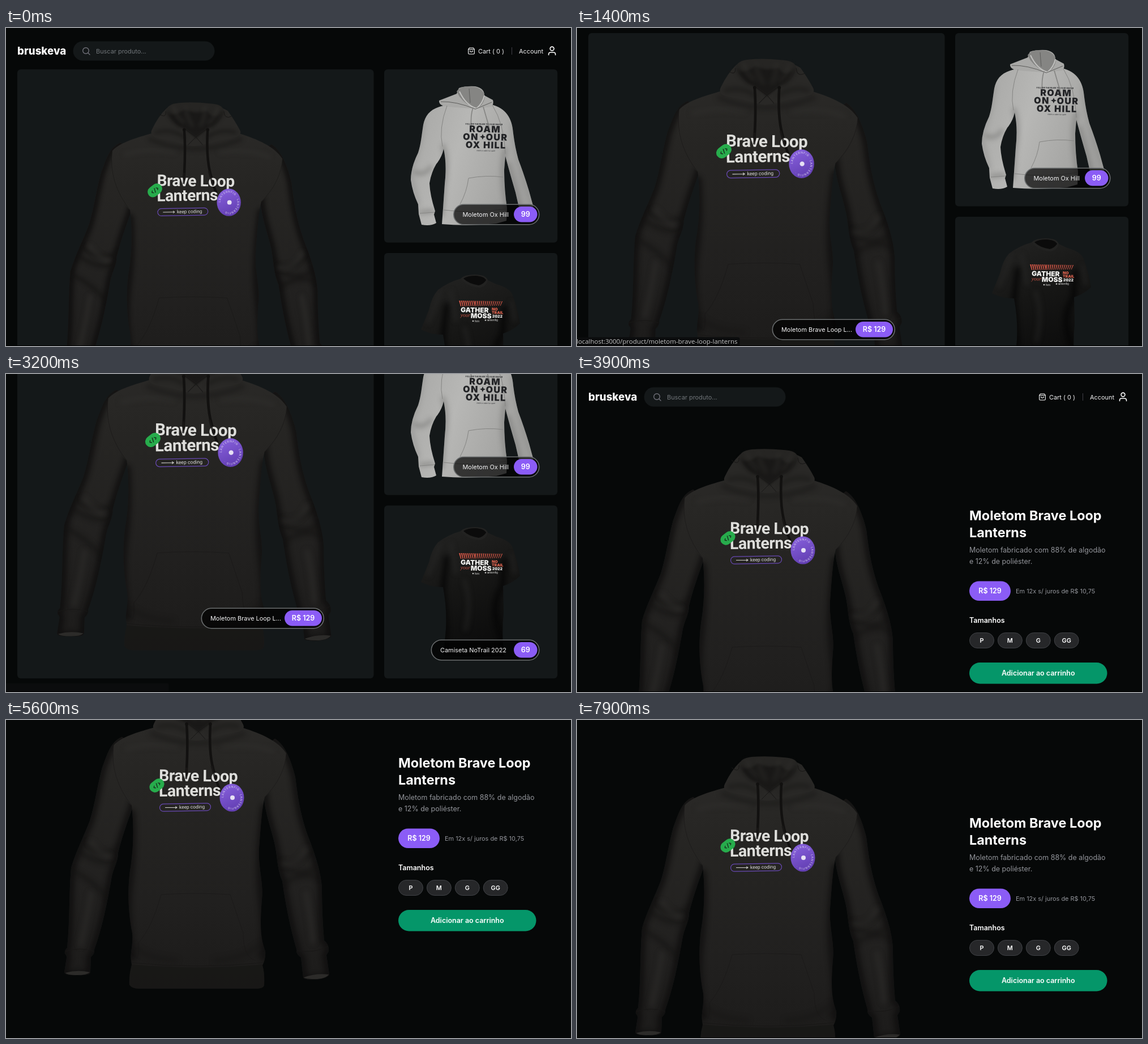
These frames come from a looping animation (998 px wide and 561 px high, 8 s). An HTML page:

```html
<!DOCTYPE html>
<html lang="pt-BR">
<head>
<meta charset="utf-8">
<title>bruskeva</title>
<style>
html, body { margin: 0; width: 100%; height: 100%; overflow: hidden; background: #060808; }
svg { display: block; width: 100%; height: 100%; font-family: Inter, sans-serif; }
text { white-space: pre; }
.line { fill: none; stroke: #fff; stroke-width: 1.4; stroke-linecap: round; stroke-linejoin: round; }
.fold { fill: none; stroke-linecap: round; filter: url(#soft); }
.rim { fill: none; stroke: #0e0d0d; stroke-width: 16; opacity: .75; filter: url(#soft); }
.seam { fill: none; stroke: #181716; stroke-width: 1; }
.print { font-family: Roboto, sans-serif; fill: #dededb; }
</style>
</head>
<body>
<svg viewBox="0 0 998 561">
<defs>
  <filter id="soft" x="-30%" y="-30%" width="160%" height="160%" color-interpolation-filters="sRGB"><feGaussianBlur stdDeviation="4"/></filter>
  <filter id="soft2" x="-30%" y="-30%" width="160%" height="160%" color-interpolation-filters="sRGB"><feGaussianBlur stdDeviation="2"/></filter>
  <linearGradient id="cloth" gradientUnits="userSpaceOnUse" x1="0" y1="40" x2="0" y2="558">
    <stop offset="0" stop-color="#2c2b29"/><stop offset=".3" stop-color="#262523"/>
    <stop offset=".7" stop-color="#21201f"/><stop offset="1" stop-color="#1c1b1a"/>
  </linearGradient>
  <linearGradient id="badge" x1="0" y1="0" x2=".4" y2="1"><stop offset="0" stop-color="#8a63e0"/><stop offset="1" stop-color="#6440b4"/></linearGradient>
  <linearGradient id="grey" x1="0" y1="0" x2="1" y2=".3"><stop offset="0" stop-color="#a6a6a4"/><stop offset=".45" stop-color="#b7b7b5"/><stop offset="1" stop-color="#a0a09e"/></linearGradient>
  <linearGradient id="tee" x1=".2" y1="0" x2=".5" y2="1"><stop offset="0" stop-color="#222221"/><stop offset=".45" stop-color="#161615"/><stop offset="1" stop-color="#0b0b0b"/></linearGradient>
  <clipPath id="cardClip"><rect x="20" y="73" width="629" height="629" rx="6"/></clipPath>
  <clipPath id="bodyClip"><path id="bodyShape" d="M262 97C240 104 205 112 190 129C186 165 200 215 222 235C226 270 226 310 219 350C215 380 215 420 223 460C225 480 219 495 221 508L222 516Q217 535 218 551Q222 558 235 558H440Q456 558 456 551Q457 530 453 517Q459 505 458 492C450 470 448 450 452 400C455 370 445 345 447 310C450 270 452 240 457 220C480 200 494 170 495 143C480 120 450 108 419 98L340 88Z"/></clipPath>
  <clipPath id="sleeveClip"><path id="sleeves" d="M205 114C184 122 178 148 170 168C160 205 158 230 148 262C138 288 122 320 115 345C111 390 113 440 108 486Q103 490 104 496Q108 500 107 504L103 529Q104 535 126 534Q150 535 149 528L150 502Q157 496 156 489C170 450 178 410 186 365C189 345 198 335 198 318C205 290 214 265 223 240L250 150ZM475 117C494 128 505 160 511 185C515 215 518 245 533 288C545 318 556 350 558 380C558 420 560 450 562 473Q571 480 570 492L566 499L571 533Q568 540 545 542Q525 542 525 538L521 503Q512 497 513 488C502 450 494 410 488 368C478 345 480 325 474 300C467 270 458 250 455 215L430 150Z"/></clipPath>
  <clipPath id="greyClip"><path id="greyShape" d="M778 136C754 140 741 150 737 171C734 190 733 205 728 220Q715 246 715 268Q718 290 728 311L729 328L734 347Q750 350 760 344L756 329L758 323Q749 295 748 274Q751 255 760 240Q770 228 773 213Q779 240 775 275L772 318L770 346Q815 350 866 345L884 340L885 318Q880 285 880 250L882 226Q890 256 900 290L908 325L935 328L924 288Q915 258 905 232Q899 210 896 186C894 157 882 142 858 135Z"/></clipPath>
  <clipPath id="teeClip"><path id="teeShape" d="M804 277Q782 283 763 297Q752 309 747 332L733 367Q750 376 772 376Q779 413 777 450L773 496Q825 501 880 497Q875 463 879 420L878 374Q896 368 908 356Q903 327 894 304Q888 293 866 287L851 280Z"/></clipPath>

  <g id="header">
    <text x="20" y="47" font-size="18.7" font-weight="800" fill="#fff">bruskeva</text>
    <rect x="118.500" y="23.500" width="250" height="34" rx="17" fill="#141819"/>
    <g class="line" style="stroke:#71717a"><circle cx="141" cy="40" r="5.300"/><path d="M145 44L148 47"/></g>
    <text x="159" y="44.500" font-size="10.92" fill="#71767a">Buscar produto...</text>
    <g class="line" style="stroke-width:1.100"><path d="M818.500 35H825.500L827.300 37.500V44.500Q827.300 46 825.800 46H818.200Q816.700 46 816.700 44.500V37.500ZM816.700 37.500H827.300M819.600 39.800Q819.600 42.200 822 42.200T824.400 39.800"/></g>
    <text x="834" y="44.500" font-size="10.92" fill="#f4f4f5">Cart ( 0 )</text>
    <rect x="893" y="34" width="1" height="13" fill="#3f3f46"/>
    <text x="906" y="44.500" font-size="10.92" fill="#f4f4f5">Account</text>
    <g class="line" style="stroke-width:1.600"><circle cx="964.500" cy="36.500" r="3.400"/><path d="M958.500 47.500V46.500Q958.500 43 962 43H967Q970.500 43 970.500 46.500V47.500"/></g>
  </g>

  <g id="hoodie">
    <use href="#sleeves" fill="url(#cloth)"/>
    <g clip-path="url(#sleeveClip)">
      <use href="#sleeves" class="rim"/>
      <path class="fold" stroke="#131211" stroke-width="7" opacity=".6" d="M132 318Q165 340 190 334M138 303Q170 326 198 312M118 350Q150 365 178 395M482 330Q510 345 538 318M488 345Q520 360 548 345M493 370Q528 352 552 362"/>
      <path class="fold" stroke="#302f2d" stroke-width="9" opacity=".5" d="M150 300Q168 322 182 324M490 337Q518 340 530 312M150 390Q144 430 132 480M530 390Q538 430 542 475"/>
      <path d="M105 530Q126 524 148 529Q143 534 126 534Q108 534 105 530ZM526 538Q548 530 570 533Q564 541 545 541Q528 541 526 538Z" fill="#2c2b29"/>
      <path class="seam" d="M105 492Q132 484 155 492M514 491Q545 496 569 483"/>
    </g>
    <use href="#bodyShape" fill="url(#cloth)"/>
    <g clip-path="url(#bodyClip)">
      <path class="fold" stroke="#0f0e0e" stroke-width="18" opacity=".7" d="M220 250Q224 310 216 370T220 500M458 240Q446 330 454 400T457 500"/>
      <path class="fold" stroke="#302f2d" stroke-width="12" opacity=".45" d="M215 135Q250 122 300 130M385 130Q440 125 470 140"/>
      <path class="fold" stroke="#171615" stroke-width="8" opacity=".5" d="M258 108Q338 142 420 108M228 485Q245 503 300 508M449 480Q420 505 370 508"/>
      <path d="M218 515Q338 526 456 515V558H218Z" fill="#151413" opacity=".55"/>
      <path class="seam" d="M220 512Q338 524 456 512"/>
    </g>
    <path class="seam" d="M274 392Q335 388 396 392L419 460Q419 502 440 508M274 392Q258 450 234 477Q236 500 230 506M190 129Q183 185 222 235M495 143Q492 185 457 220" opacity=".55"/>
    <path d="M288 52Q273 66 261 91Q256 102 271 106Q300 111 326 119Q338 122 352 118Q382 110 410 105Q423 101 419 92Q410 75 397 57L389 53Z" fill="#292826"/>
    <path d="M286 57Q289 45 309 43Q336 41 365 44Q388 45 390 57Q386 78 364 88L340 108L320 90Q295 78 286 57Z" fill="#262523"/>
    <path d="M292 63Q300 80 320 90L340 105L363 87Q378 78 383 62Q370 74 360 57Q338 64 320 54Q307 65 292 63Z" fill="#191817" filter="url(#soft2)"/>
    <path class="fold" stroke="#363532" stroke-width="4" opacity=".6" d="M300 50Q303 67 318 78M321 50Q322 65 334 84M356 50Q358 67 348 84M379 52Q377 69 362 80"/>
    <path class="fold" stroke="#121110" stroke-width="4" opacity=".75" d="M268 96Q298 88 320 105M411 96Q385 88 360 104M290 60Q297 76 312 85M388 60Q380 76 367 86"/>
    <path class="seam" d="M273 62Q287 72 286 58M404 67Q391 73 390 58M340 104L319 89M340 104L362 88M326 118L340 104L352 118"/>
    <path d="M319 91Q322 130 318 188M361 91Q358 140 366 170T376 202" fill="none" stroke="#121110" stroke-width="4.500" stroke-linecap="round"/>
    <circle cx="319" cy="91" r="2.800" fill="#11100f"/><circle cx="361" cy="91" r="2.800" fill="#11100f"/>
    <g class="print" font-size="28.5" font-weight="600" letter-spacing="-.45">
      <text x="270" y="191.500" transform="rotate(.6 270 191)">Brave Loop</text>
      <text x="270" y="219" transform="rotate(-.8 270 219)">Lanterns</text>
    </g>
    <path d="M319 168Q319 178 318 188M363 165Q367 180 371 191" fill="none" stroke="#191817" stroke-width="3.500" opacity=".8"/>
    <g transform="rotate(-1 316 238)">
      <rect x="271.500" y="231.500" width="90" height="13" rx="6.500" fill="none" stroke="#6849b4" stroke-width="1.200"/>
      <path d="M281 238H302M299 236L302 238L299 240" fill="none" stroke="#d0d0cc"/>
      <text class="print" x="306" y="240.500" font-size="8.4">keep coding</text>
    </g>
    <g transform="translate(266.500 199.500) rotate(-38)">
      <rect x="-14" y="-9.500" width="28" height="19" rx="9.500" fill="#27ac4c"/>
      <path d="M-4 -2.500L-6.500 0L-4 2.500M4 -2.500L6.500 0L4 2.500M1.500 -4L-1.500 4" fill="none" stroke="#16251a" stroke-width="1.300"/>
    </g>
    <g transform="translate(399 221)">
      <ellipse rx="21.500" ry="24.500" fill="url(#badge)"/>
      <path id="ring" d="M-15 0A15 17.500 0 0 1 15 0A15 17.500 0 0 1 -15 0" fill="none"/>
      <text font-size="5" font-weight="500" letter-spacing=".7" fill="#cdc0ec"><textPath href="#ring">LANTERNFIG · LANTERNFIG ·</textPath></text>
      <circle cx="1" cy="0" r="4" fill="#e6e0f4"/>
    </g>
  </g>

  <g id="greyHoodie">
    <use href="#greyShape" fill="url(#grey)"/>
    <g clip-path="url(#greyClip)">
      <path class="fold" stroke="#6c6c6a" stroke-width="7" opacity=".5" d="M772 208Q782 238 774 280L770 330M882 215Q874 245 880 290L885 325M722 254Q738 262 750 246M733 325L754 323M888 240L908 315"/>
      <path class="fold" stroke="#80807e" stroke-width="5" opacity=".5" d="M737 165Q733 205 714 255L728 311M894 170Q897 215 930 315"/>
    </g>
    <path d="M796 116L765 128Q764 135 774 138Q800 141 830 142L858 139Q862 133 860 127L845 119Q845 106 829 103Q811 102 800 106Z" fill="#a9a9a7"/>
    <path d="M796 112Q800 105 813 103L829 104Q844 108 846 122Q843 137 831 142Q812 136 801 121Z" fill="#858583"/>
    <path d="M801 112Q812 136 831 142Q842 133 845 119" fill="none" stroke="#c0c0be" stroke-width="2"/>
    <path d="M818 107L820 132M768 130Q795 129 829 143L858 131" fill="none" stroke="#5c5c5a"/>
    <path d="M825 140Q820 155 822 176M843 139Q849 160 855 180" fill="none" stroke="#858583" stroke-width="1.700"/>
    <path d="M817 265Q848 259 878 263M817 265Q814 289 802 311M773 321Q825 328 885 319M731 327L757 325M779 137Q764 177 771 209M859 136Q880 169 882 222" fill="none" stroke="#858583"/>
    <g transform="rotate(1 845 190)" text-anchor="middle" fill="#222326">
      <text x="844" y="171" font-size="3.6" font-weight="700">FOLLOW THE RIVER TO YOUR WATER</text>
      <g font-size="16" font-weight="900" letter-spacing="1.4">
        <text x="846" y="184">ROAM</text><text x="821" y="198">ON</text><text x="867" y="198">OUR</text>
        <text x="848" y="212">OX HILL</text>
      </g>
      <path d="M842 187L843.500 190.500L847 192L843.500 193.500L842 197L840.500 193.500L837 192L840.500 190.500Z"/>
      <text x="848" y="217.500" font-size="3">made in water for quiet</text>
    </g>
  </g>

  <g id="shirt" transform="translate(0 165)">
    <use href="#teeShape" fill="url(#tee)"/>
    <g clip-path="url(#teeClip)">
      <path class="fold" stroke="#2a2a29" stroke-width="7" opacity=".5" d="M766 302Q756 328 746 354M786 300L795 350M810 365Q823 400 812 450M893 320L899 350"/>
      <path class="fold" stroke="#050505" stroke-width="9" opacity=".8" d="M778 325L772 380L777 450L772 496M880 330L877 375Q852 410 876 465L880 497"/>
    </g>
    <path d="M803 277Q810 270 828 270Q848 270 851 280Q848 291 838 293Q814 292 803 277Z" fill="#222221"/>
    <path d="M808 277Q815 272 829 272Q845 273 848 280Q842 288 835 289Q817 286 808 277Z" fill="#0b0b0b"/>
    <g id="stripes" fill="#c95445"/>
    <g font-weight="900" fill="#f0f0ee" transform="rotate(1 840 335)">
      <text x="803" y="337" font-size="12">GATHER</text><text x="821" y="347" font-size="12">MOSS</text>
      <text x="803" y="345" font-size="9.5" font-weight="400" font-style="italic" font-family="Liberation Serif, serif" fill="#c95445">your</text>
      <g font-size="6.8"><text x="858" y="333" fill="#e06450">NO</text><text x="858" y="339" fill="#e06450">TRAIL</text><text x="859" y="345.500">2022</text></g>
    </g>
    <g font-size="4" font-weight="600" fill="#c9c9c7"><circle cx="825" cy="352" r="1.300"/><text x="828" y="353.500">fern</text><circle cx="847" cy="350.500" r="1.300"/><text x="850" y="352">lanternfig</text></g>
  </g>
</defs>

<rect width="998" height="561" fill="#060808"/>
<g id="store">
  <use href="#header"/>
  <g fill="#141819">
    <rect x="20" y="73" width="629.500" height="629" rx="6"/>
    <rect x="668" y="73" width="306" height="305.500" rx="6"/>
    <rect x="668" y="397" width="306" height="305" rx="6"/>
  </g>
  <g clip-path="url(#cardClip)"><g id="zoom"><use href="#hoodie" transform="translate(20 73) scale(.9859) translate(-20 17)"/></g></g>
  <use href="#greyHoodie"/><use href="#shirt"/>
  <g id="labels"/>
</g>
<g id="product">
  <use href="#header"/>
  <use href="#hoodie" y="90"/>
  <g id="details"/>
</g>
<g id="status">
  <path d="M0 545.500H284Q287.500 545.500 287.500 549V561H0Z" fill="#0b0c0d"/>
  <text id="link" x="-1" y="557" font-size="11.45" font-family="Open Sans, sans-serif" fill="#c4c4c4">localhost:3000/product/moletom-brave-loop-lanterns</text>
</g>
<rect y="560" width="998" height="1" fill="#000"/>
</svg>
<script>
const $ = id => document.getElementById(id);
const LOOP = 8000, STEP = 100;

function add(parent, tag, attrs, text) {
  const el = document.createElementNS('http://www.w3.org/2000/svg', tag);
  for (const k in attrs) el.setAttribute(k, attrs[k]);
  if (text) el.textContent = text;
  parent.append(el);
}
const write = (g, x, y, size, weight, fill, text, anchor = 'start') =>
  add(g, 'text', { x, y, 'font-size': size, 'font-weight': weight, fill, 'text-anchor': anchor }, text);

function pill(g, x, y, width, height, look, size, text) {
  add(g, 'rect', { x, y, width, height, rx: height / 2, ...look });
  write(g, x + width / 2, y + height / 2 + size * .363, size, 600, '#fff', text, 'middle');
}
const violet = { fill: '#8b5cf6' };

function label(x, y, right, name, priceX, price) {
  const g = $('labels');
  add(g, 'rect', { x: x + .8, y: y + .8, width: right - x - 1.6, height: 35.4, rx: 17.7,
    fill: '#000', 'fill-opacity': .7, stroke: '#696c6d', 'stroke-width': 1.6 });
  write(g, x + 16.5, y + 22, 10.92, 400, '#f4f4f5', name);
  pill(g, priceX, y + 4.5, right - 4 - priceX, 27.5, violet, 12.48, price);
}
label(344.5, 577.5, 562, 'Moletom Brave Loop L...', 492, 'R$ 129');
label(790, 310.5, 942.5, 'Moletom Ox Hill', 897, '99');
label(750.5, 633.5, 942.5, 'Camiseta NoTrail 2022', 897, '69');

for (let i = 0; i < 22; i++) {
  const x = 800 + i * 3.6, w = 2.5 - i * .05, lean = i < 8 ? 2 : -1 - i * .12;
  add($('stripes'), 'path', { d: `M${x} ${316 + i * .05}h${w}l${lean} ${10 - i * .1}h${-w * .6}Z` });
}

const d = $('details');
write(d, 693, 258, 23.4, 700, '#fff', 'Moletom Brave Loop');
write(d, 693, 287.5, 23.4, 700, '#fff', 'Lanterns');
write(d, 693, 315, 12.48, 400, '#93959b', 'Moletom fabricado com 88% de algodão');
write(d, 693, 335, 12.48, 400, '#93959b', 'e 12% de poliéster.');
pill(d, 693, 365.5, 73, 34.5, violet, 12.48, 'R$ 129');
write(d, 775, 386.5, 10.92, 400, '#93959b', 'Em 12x s/ juros de R$ 10,75');
write(d, 693, 438.5, 12.48, 600, '#fff', 'Tamanhos');
['P', 'M', 'G', 'GG'].forEach((s, i) =>
  pill(d, 693.5 + i * 49.9, 456.5, 43, 27, { fill: '#262729', stroke: '#3f4145' }, 10.92, s));
pill(d, 693, 509, 243.5, 37.5, { fill: '#059669' }, 12.48, 'Adicionar ao carrinho');

const ramp = (t, from, to) => Math.min(1, Math.max(0, (t - from) / (to - from)));
function ease(t, from, to) {
  const u = ramp(t, from, to);
  return u * u * (3 - 2 * u);
}
const scroll = (id, y) => $(id).setAttribute('transform', `translate(0 ${-Math.round(y)})`);

function draw(ms) {
  const t = Math.floor(ms % LOOP / STEP) * STEP;
  const inStore = t < 3400;
  $('store').style.display = inStore ? '' : 'none';
  $('product').style.display = inStore ? 'none' : '';

  scroll('store', 94 * ease(t, 1225, 1505) + 71 * ease(t, 1620, 1900));
  scroll('product', 174 * (ease(t, 5028, 5560) - ease(t, 7544, 8165)));

  const zoom = 1 + .05 * ease(t, 30, 580);
  $('zoom').setAttribute('transform', `translate(334.5 387.5) scale(${zoom}) translate(-334.5 -387.5)`);

  $('status').setAttribute('opacity', ramp(t, 0, 200) * (1 - ramp(t, 3600, 3900)));
  $('link').style.display = t < 3200 ? '' : 'none';
}

const start = performance.now();
function tick() {
  draw(performance.now() - start);
  requestAnimationFrame(tick);
}
draw(0);
requestAnimationFrame(tick);
</script>
</body>
</html>
```
